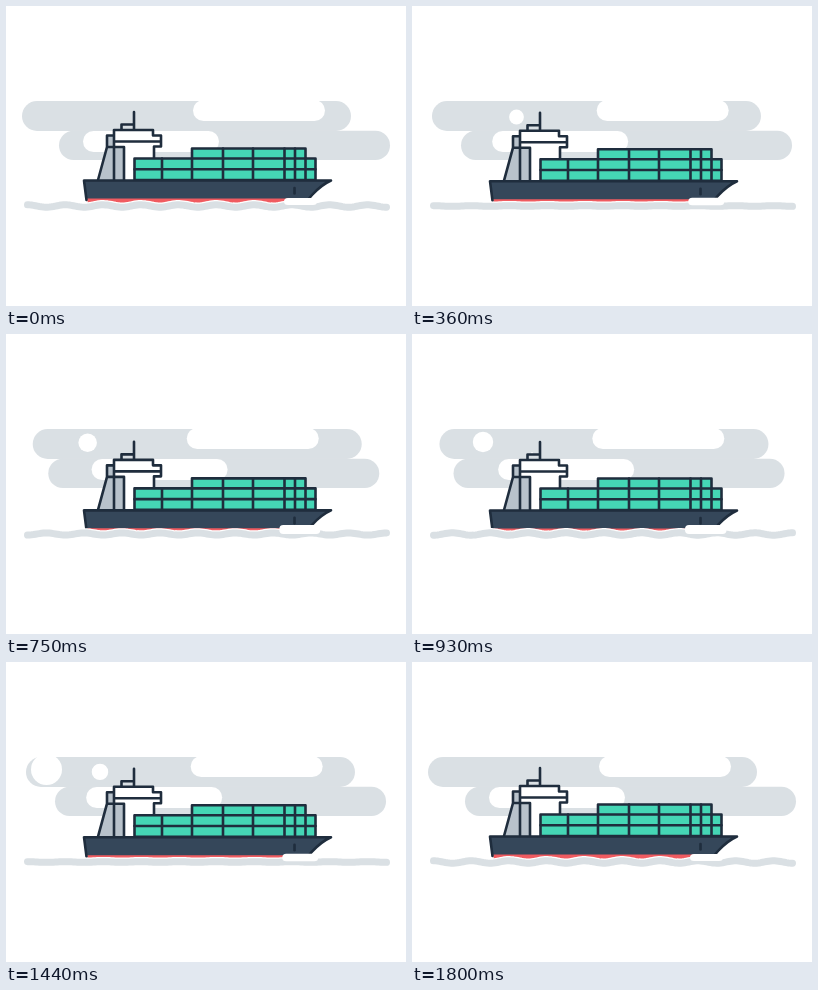
These frames come from a looping animation (400 px wide and 300 px high, 1.86 s). An HTML page:

```html
<!DOCTYPE html>
<html lang="en">
<head>
<meta charset="utf-8">
<title>Cargo ship</title>
<style>
  html, body { margin: 0; width: 100%; height: 100%; overflow: hidden; background: #fff; }
  svg { display: block; width: 400px; height: 300px; }
  .mist { fill: #dae0e4; }
  .white { fill: #fff; }
  .steel { fill: #b8c2cb; }
  .teal { fill: #45d6b5; }
  .line { stroke: #1f2d3d; stroke-width: 2.6; stroke-linejoin: round; stroke-linecap: round; }
  .open { fill: none; }
  .wave { fill: none; stroke-linecap: round; stroke-linejoin: round; }
</style>
</head>
<body>
<svg viewBox="0 0 400 300">
  <rect id="cloudTop" class="mist" x="16" y="95" width="329" height="30" rx="15"/>
  <rect id="cloudLow" class="mist" x="53" y="124.8" width="331" height="29.2" rx="14.6"/>
  <rect id="gapTop" class="white" x="187" y="94" width="132" height="21" rx="10.5"/>
  <rect id="gapLow" class="white" x="77" y="125" width="136" height="21" rx="10.5"/>
  <circle class="puff white"/>
  <circle class="puff white"/>

  <g id="ship">
    <path class="white" d="M108 124H147V129.5H155V140.5H148V153H129V174H118V141H108Z"/>
    <path class="steel" d="M101 129.5H108V141H118V174H92L101 141Z"/>
    <path class="line open" d="M128 106V124M115.5 124V118.5H128
      M108 174V124H147V129.5H155V140.5H148V152
      M108 135.5H155M108 129.5H101V141H118V174M101 141L92 174"/>
    <path class="teal line" d="M128.5 174V152.5H186V142.5H299.5V152.5H309.5V174Z"/>
    <path class="line open" d="M186 152.5H299.5M128.5 163.3H309.5M156 152.5V174
      M186 152.5V174M217 142.5V174M247 142.5V174M278.5 142.5V174M289 142.5V174M299.5 152.5V174"/>
    <path fill="#f05b60" d="M81 191H303L298 199H82Z"/>
    <path fill="#35475a" d="M78 174.5H325Q315 179 306 189L303 192.5H80.5Z"/>
    <path class="line open" d="M80.5 194L78 174.5H325Q315 179 306 189L303 192.5"/>
    <path class="line open" d="M288.5 182V187.5" stroke-width="2"/>
  </g>

  <path class="wave" stroke="#fff" stroke-width="9.5"/>
  <path class="wave" stroke="#dae0e4" stroke-width="7"/>
  <rect id="foam" class="white" rx="4"/>
</svg>
<script>
  const LOOP = 1860, STEP = 30, SWING = 1800, PUFF_GAP = 900;
  const SEA = { left: 21.5, right: 380.5, y: 200, waves: 9.5, height: 1.2 };
  // time, x, y, radius
  const PUFF_PATH = [
    [0, 121, 120, 0], [150, 116, 114.5, 4], [270, 109.7, 111.6, 6.5],
    [360, 104.5, 111, 7.4], [600, 90.5, 109.5, 8.5], [930, 71, 108, 10.2],
    [1170, 56.5, 107.5, 12.6], [1440, 40.5, 107.5, 15.5], [1800, 19, 107, 19]
  ];

  const byId = id => document.getElementById(id);
  const puffs = document.querySelectorAll('.puff');
  const waves = document.querySelectorAll('.wave');
  const shift = (id, x, y = 0) => byId(id).setAttribute('transform', `translate(${x} ${y})`);
  const set = (el, attrs) => {
    for (const key in attrs) el.setAttribute(key, attrs[key]);
  };

  function puffAt(age) {
    const next = PUFF_PATH.findIndex(p => p[0] > age);
    if (age < 0 || next < 1) return [0, 0, 0];
    const a = PUFF_PATH[next - 1], b = PUFF_PATH[next];
    const k = (age - a[0]) / (b[0] - a[0]);
    return [1, 2, 3].map(i => a[i] + (b[i] - a[i]) * k);
  }

  function wavePath(height) {
    const span = SEA.right - SEA.left, count = 180;
    let d = '';
    for (let i = 0; i <= count; i++) {
      const u = i / count;
      const y = SEA.y - height * Math.cos(u * SEA.waves * 2 * Math.PI);
      d += `${i ? 'L' : 'M'}${(SEA.left + span * u).toFixed(2)} ${y.toFixed(2)}`;
    }
    return d;
  }

  function draw(time) {
    const t = Math.min(Math.floor(time / STEP) * STEP, SWING) % SWING;
    const swing = Math.cos(t / SWING * 2 * Math.PI);
    const k = (1 - swing) / 2;

    shift('cloudTop', 11.5 * k);
    shift('cloudLow', -11.5 * k);
    shift('gapTop', -6.7 * k);
    shift('gapLow', 9.2 * k);
    shift('ship', 0, 2 * k);

    puffs.forEach((el, i) => {
      const [cx, cy, r] = puffAt(t - i * PUFF_GAP);
      set(el, { cx, cy, r });
    });

    const d = wavePath(SEA.height * swing);
    waves.forEach(el => set(el, { d }));
    set(byId('foam'), {
      x: 278 - 5 * k, y: 192 - k, width: 33 + 8.5 * k, height: 7 + 2 * k
    });
  }

  const start = performance.now();
  function tick() {
    draw((performance.now() - start) % LOOP);
    requestAnimationFrame(tick);
  }
  tick();
</script>
</body>
</html>
```
